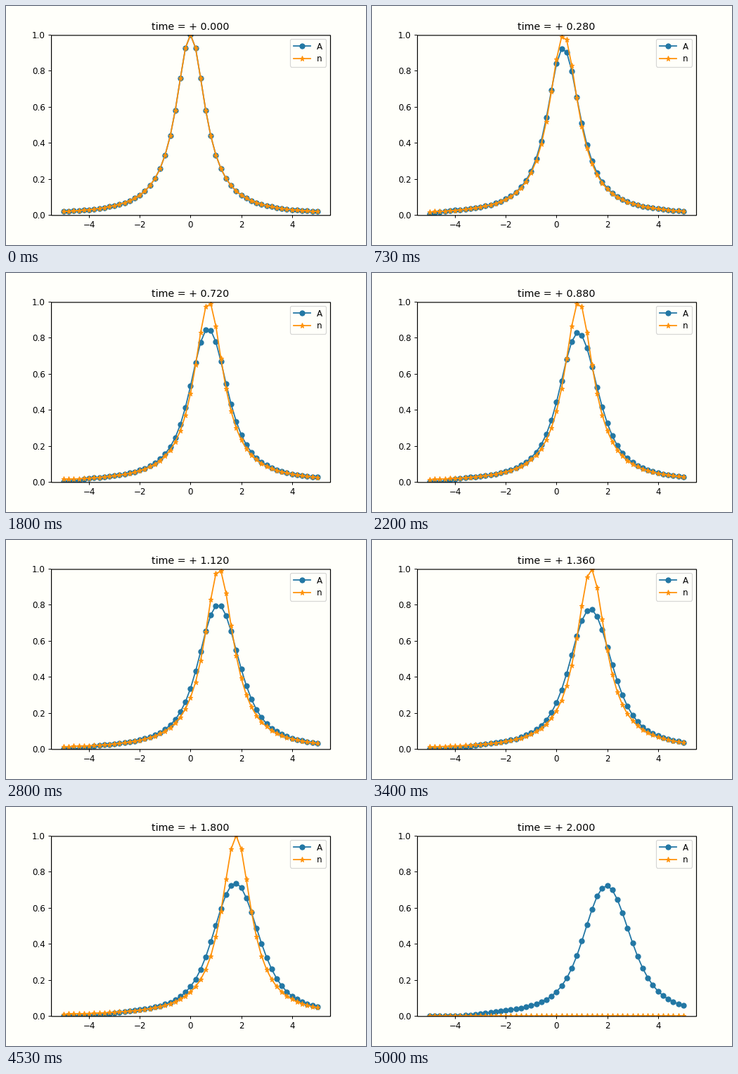
Animation of 512 by 341 pixels, one loop 5070 ms. Source, as a matplotlib script:

```python
import numpy as np
import matplotlib.pyplot as plt
from matplotlib.animation import FuncAnimation
from matplotlib.patches import Rectangle

DPI = 256 / 3
LOOP_MS = 5070
TICK_MS = 30
STEPS = 50
DT = 0.04
DX = 0.2
SPEED = 1.0
PAPER = "#fffffa"

x = np.linspace(-5, 5, 51)


def bump(pos):
    return 1 / (1 + 2 * pos**2)


def upwind(u):
    """One first-order upwind step with nothing flowing in from the left."""
    return u - SPEED * DT / DX * np.diff(u, prepend=0)


smeared = [bump(x)]
for _ in range(STEPS):
    smeared.append(upwind(smeared[-1]))

# The sharp curve just travels; its last row is empty.
sharp = [bump(x - SPEED * DT * k) for k in range(STEPS)] + [np.zeros_like(x)]

fig, ax = plt.subplots(figsize=(512 / DPI, 341 / DPI), dpi=DPI, facecolor=PAPER)
fig.subplots_adjust(left=0.125, right=0.9, bottom=0.125, top=0.88)
ax.set(xlim=(-5.5, 5.5), ylim=(0, 1), xticks=range(-4, 5, 2), facecolor=PAPER)
ax.tick_params(axis="x", pad=2.7)

# A soft frame in pixels instead of the pixel-snapped spines.
ax.spines[:].set_visible(False)
ax.add_patch(Rectangle((64.6, 42.2), 396.9, 256.9, fill=False, lw=1, snap=False,
                       transform=None, clip_on=False, zorder=2.5))

line_a, = ax.plot(x, smeared[0], "o-", color="#2277a4", label="A")
line_n, = ax.plot(x, sharp[0], "*-", color="#ff920a", label="n")
title = ax.set_title("")
ax.legend(loc="upper right", labelspacing=0.38, facecolor=PAPER)


def step_at(ms):
    """Even steps hold 130 ms, odd steps 70 ms."""
    pair, rest = divmod(ms, 200)
    return 2 * pair + (rest >= 130)


def draw(i):
    k = step_at(i * TICK_MS + 20)
    line_a.set_ydata(smeared[k])
    line_n.set_ydata(sharp[k])
    title.set_text(f"time = +{k * DT:6.3f}")
    return line_a, line_n, title


anim = FuncAnimation(fig, draw, frames=LOOP_MS // TICK_MS, interval=TICK_MS,
                     init_func=lambda: draw(0), repeat=True, repeat_delay=0)
plt.show()
```
